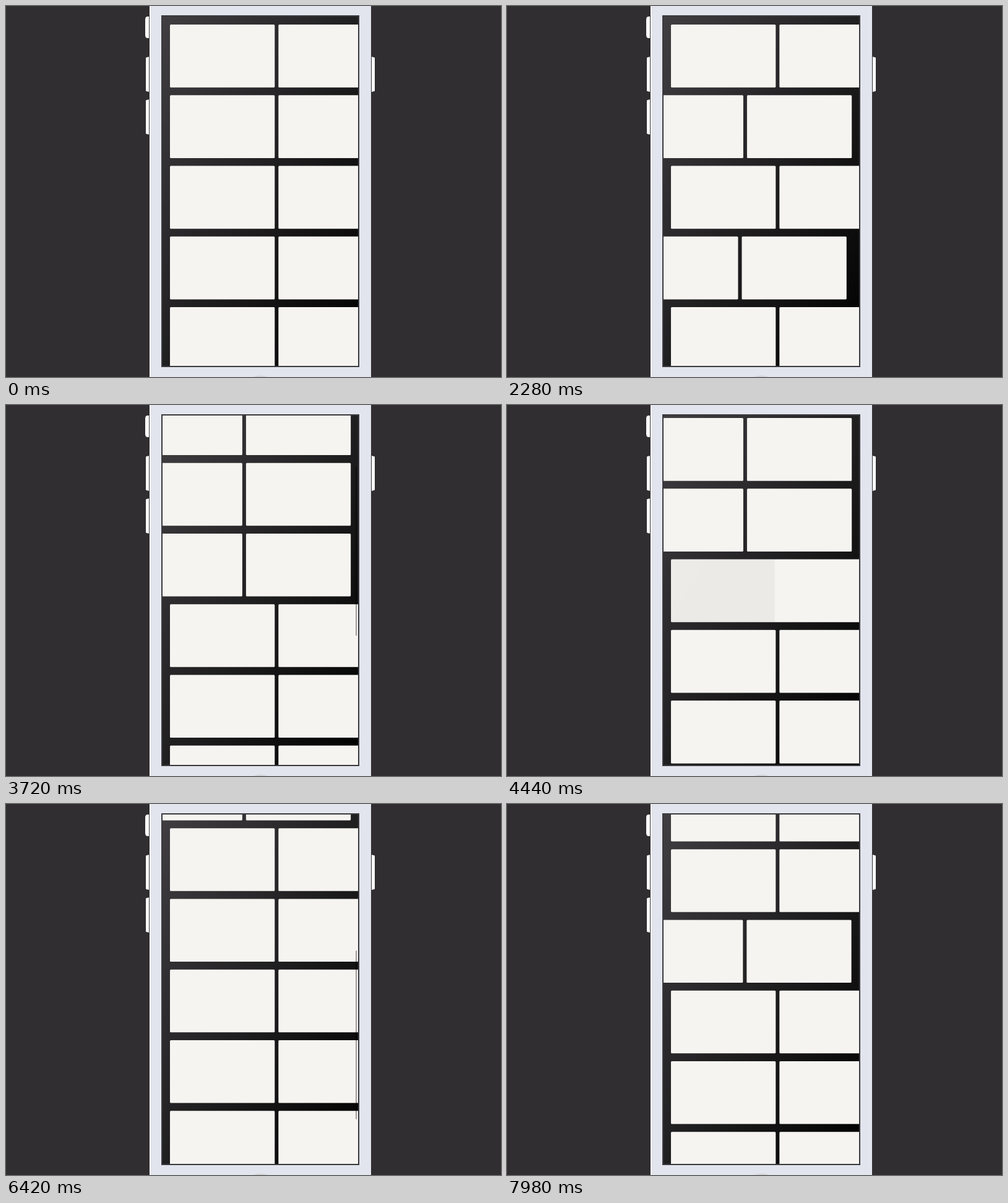
Animation of 800x600 px, one loop 8 s. Source, as an HTML page with a canvas:

```html
<!DOCTYPE html>
<html lang="en">
<head>
<meta charset="utf-8">
<title>Card rows on a phone</title>
<style>
  html, body { margin: 0; width: 100%; height: 100%; overflow: hidden; background: #302e31; }
  svg, canvas { position: absolute; left: 0; top: 0; }
  canvas { left: 253px; top: 17px; background: linear-gradient(to bottom right, #403e41, #000); }
</style>
</head>
<body>
<svg width="800" height="600">
  <g fill="#fff">
    <path d="M231 17h-2q-4 0-4 5v25q0 5 4 5h2z"/>
    <path d="M231 82l-5 1.500v54l5 1.500z"/>
    <path d="M231 151l-5 1.500v54l5 1.500z"/>
    <path d="M591 82l5 1.500v54l-5 1.500z"/>
    <path d="M232 0h2v600h-2z"/>
  </g>
  <path fill="#e2e5ed" d="M234 0h356v600h-356z"/>
  <circle cx="411" cy="630.500" r="33" fill="#d2d4d9"/>
  <path fill="#3a393d" d="M251 15h320v569h-320z"/>
</svg>
<canvas id="screen" width="316" height="565"></canvas>
<script>
const ctx = document.getElementById('screen').getContext('2d');
const LOOP = 8000, STEP = 30;
const CARD = { x: 12, y: 13.1, w: 169.3, h: 101.6, dx: 175.3, dy: 114.25 };
const ROWS = 10, ROW_END = 52.4, ROW_PEAK = 70;
const swipes = { 1: 870, 3: 1700, 2: 2522, 6: 7180 };   // row: start time
const removals = { 4: 4440, 5: 5130 };

const clamp = x => Math.min(1, Math.max(0, x));
const smooth = x => x * x * (3 - 2 * x);
const glide = x => 1 - (1 - x ** 1.3) ** 2;

// Drag past the end of the row, then spring back to it.
function rowShift(row, t) {
  const age = t - swipes[row], drag = 470;
  if (!(age > 0)) return 0;
  if (age < drag) return ROW_PEAK * glide(age / drag);
  const d = (age - drag) / 63;
  return ROW_END + (ROW_PEAK - ROW_END) * (1 + d) * Math.exp(-d);
}

// The first card fades while the following ones close the gap.
function removal(row, t) {
  const age = t - removals[row];
  return age >= 0 ? smooth(clamp((age + 35) / 275)) : 0;
}

function scrollAt(t) {
  return 237.5 * glide(clamp((t - 3300) / 780))
    + 321 * glide(clamp((t - 6030) / 770))
    - 30.4 * smooth(clamp((t - 6840) / 80));
}

function barAlpha(t) {
  const shown = (from, fade) => t > from ? clamp(1 - (t - fade) / 150) : 0;
  return Math.max(shown(3300, 4140), shown(6030, 7020));
}

function box(x, y, w, h, r) {
  ctx.beginPath();
  ctx.roundRect(x, y, w, h, r);
  ctx.fill();
}

function draw(t) {
  const scroll = scrollAt(t);
  ctx.clearRect(0, 0, 316, 565);
  ctx.fillStyle = '#f5f4f0';
  for (let row = 0; row < ROWS; row++) {
    const y = CARD.y + row * CARD.dy - scroll;
    const p = removal(row, t);
    const x = CARD.x - rowShift(row, t);
    ctx.globalAlpha = 1 - p;
    box(x, y, CARD.w, CARD.h, 1.5);
    ctx.globalAlpha = 1;
    for (let i = 1; i <= (p ? 2 : 1); i++)
      box(x + (i - p) * CARD.dx, y, CARD.w, CARD.h, 1.5);
  }
  ctx.fillStyle = `rgba(0,0,0,${0.36 * barAlpha(t)})`;
  box(312, 3.6 + scroll * 0.483, 2, 273, 1);
}

function frame(now) {
  const t = now % LOOP;
  draw(Math.floor(t / STEP) * STEP);
  requestAnimationFrame(frame);
}
requestAnimationFrame(frame);
</script>
</body>
</html>
```
